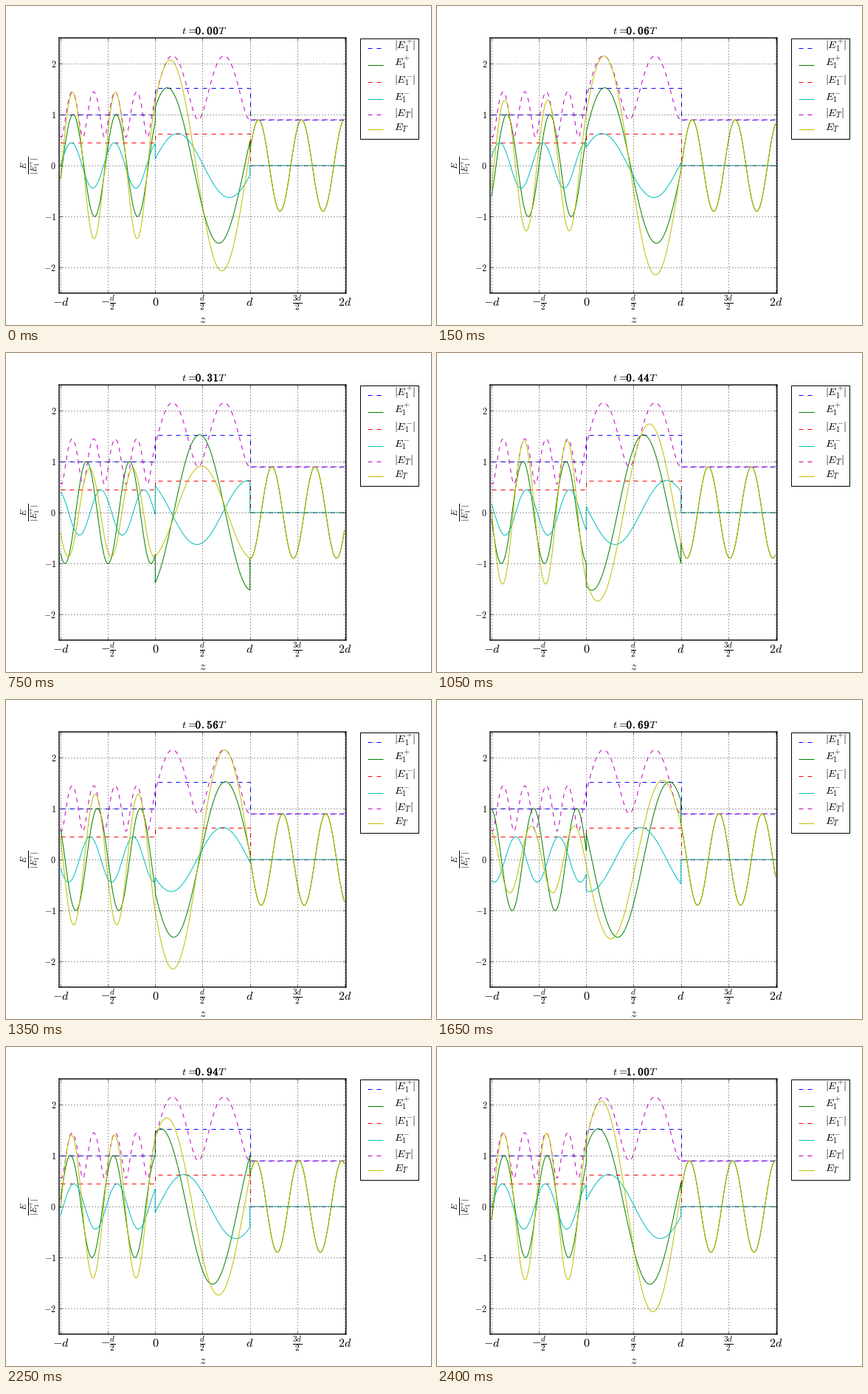
Animation, 576 px wide and 432 px high, one loop 2.55 s. Source, as a matplotlib script:

```python
import numpy as np
import matplotlib.pyplot as plt
from matplotlib.animation import FuncAnimation
from matplotlib.patches import Rectangle
from matplotlib.patheffects import withStroke

W, H, DPI = 576, 432, 72
STEPS, INTERVAL = 16, 150

plt.rcParams.update({
    "mathtext.fontset": "cm",
    "lines.linewidth": 1.0,
    "lines.scale_dashes": False,
    "lines.dashed_pattern": [6, 6],
    "lines.dotted_pattern": [1, 3],
    "lines.dash_capstyle": "butt",
    "lines.solid_capstyle": "butt",
    "axes.linewidth": 1.4,
    "axes.axisbelow": False,
    "path.simplify": False,
})

# Slab of index 1 between two media of index N, lengths in units of d
N = 2.4
K2 = 11 * np.pi / 6
K1 = N * K2
RHO = (N - 1) / (N + 1)


def fields(count=334):
    """Complex forward and backward waves over the three regions."""
    left, slab, right = (np.linspace(a, a + 1, count) for a in (-1, 0, 1))
    trip = np.exp(2j * K2)
    den = 1 - RHO**2 * trip
    into = (1 + RHO) / den
    r = RHO * (1 - trip) / den
    out = (1 - RHO) * into * np.exp(1j * K2)
    fwd = np.concatenate([
        np.exp(1j * K1 * left),
        into * np.exp(1j * K2 * slab),
        out * np.exp(1j * K1 * (right - 1))])
    back = np.concatenate([
        r * np.exp(-1j * K1 * left),
        -RHO * into * trip * np.exp(-1j * K2 * slab),
        0 * right])
    phase = np.conj(fwd[-1]) / abs(fwd[-1])   # crest at z = 2d when t = 0
    return np.concatenate([left, slab, right]), fwd * phase, back * phase


z, fwd, back = fields()
waves = [fwd, back, fwd + back]

fig = plt.figure(figsize=(W / DPI, H / DPI), dpi=DPI, facecolor="white")
ax = fig.add_axes([0.125, 0.1, 0.675, 0.8])
ax.set_xlim(-1.015, 2.015)
ax.set_ylim(-2.5, 2.5)
ax.set_xticks(np.arange(-1, 2.1, 0.5), [""] * 7)
ax.set_yticks(range(-2, 3), [f"${v}$" for v in range(-2, 3)])
ax.tick_params(direction="in", length=4, width=0.5, pad=4, labelsize=12,
               top=True, right=True)
ax.grid(color="black", linestyle=":", linewidth=0.75)
for spine in ax.spines.values():
    spine.set_snap(False)

moving = []
for wave, (dash, solid) in zip(waves, ("bg", "rc", "my")):
    ax.plot(z, abs(wave), dash + "--")
    moving += ax.plot(z, wave.real, solid)


def label(x, y, text, size, ha="center", va="baseline", **style):
    """Text anchored at pixel (x, y), measured from the top left."""
    return fig.text(x / W, 1 - y / H, text, fontsize=size, ha=ha, va=va, **style)


ticks = ["-d", r"-\frac{d}{2}", "0", r"\frac{d}{2}", "d", r"\frac{3d}{2}", "2d"]
for i, name in enumerate(ticks):
    label(73.9 + 64.16 * i, 405.5, f"${name}$", 16)
label(266.5, 429, "$z$", 16)
label(33.5, 216, r"$\frac{E}{|E_1^{+}|}$", 16, va="center", rotation=90)

# Title: the number is set in a heavier, wider face than the letters
label(238, 38.2, r"$t\hspace{0.08}=$", 14.4, "left")
clock = label(272.8, 38.2, "", 14.4,
              path_effects=[withStroke(linewidth=0.4, foreground="black")])
label(287, 38.2, "$T$", 14.4, "left")

# Legend
fig.add_artist(Rectangle((480 / W, 1 - 180 / H), 79 / W, 136 / H,
                         fc="white", ec="black", lw=1))
rows = [(r"|E_1^{+}|", "b--", 56), (r"E_1^{+}", "g-", 79),
        (r"|E_1^{-}|", "r--", 102), (r"E_1^{-}", "c-", 125),
        (r"|E_T|", "m--", 146), (r"E_T", "y-", 166)]
for name, fmt, y in rows:
    fig.add_artist(plt.Line2D([490 / W, 511 / W], [1 - (y + 0.6) / H] * 2,
                              color=fmt[0], linestyle=fmt[1:]))
    label(526, y + 2.5, f"${name}$", 14.4, "left")


def update(frame):
    t = frame / STEPS
    turn = np.exp(-2j * np.pi * t)
    for line, wave in zip(moving, waves):
        line.set_ydata((wave * turn).real)
    digits = r"\hspace{0.075}".join(f"{t:.2f}")
    clock.set_text(rf"$\mathbf{{{digits}}}$")
    return moving + [clock]


anim = FuncAnimation(fig, update, frames=STEPS + 1, interval=INTERVAL,
                     repeat=True, repeat_delay=0, blit=False)
plt.show()
```
